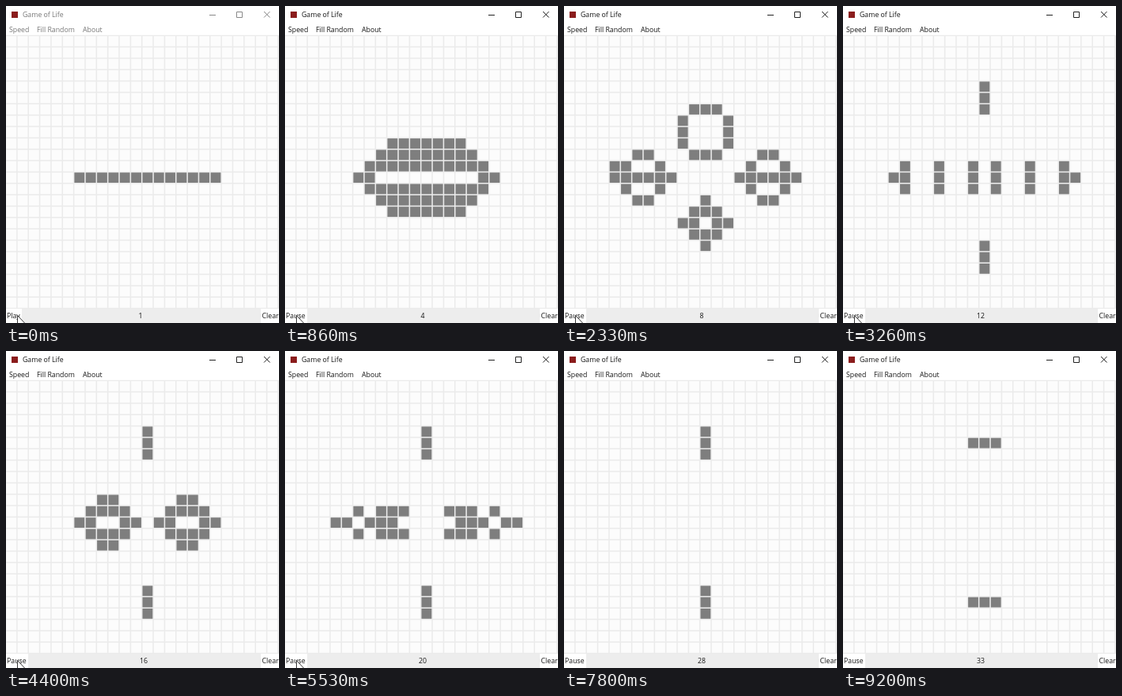
Recreate the animation shown at these times as an HTML page. Size 345 by 400 pixels, loop 9.53 s.

```html
<!DOCTYPE html>
<html lang="en">
<head>
<meta charset="utf-8">
<title>Game of Life</title>
<style>
  html, body { margin: 0; width: 100%; height: 100%; overflow: hidden; background: #fff; }
  svg { display: block; width: 100%; height: 100%; }
  text { font: 8.75px "Open Sans", "Noto Sans", sans-serif; fill: #161616; }
  .chrome path { fill: none; stroke: #222; }
  .inactive text { fill: #777; }
  .inactive path { stroke: #888; }
</style>
</head>
<body>
<svg viewBox="0 0 345 400">
  <rect width="345" height="400" fill="#fff"/>
  <g class="chrome" id="chrome">
    <rect x="7" y="7" width="8" height="8" fill="#8a1c1c"/>
    <text x="21" y="14">Game of Life</text>
    <text x="4" y="33">Speed</text>
    <text x="39" y="33">Fill Random</text>
    <text x="97" y="33">About</text>
    <path d="M257 11.5h8M291.5 7.5h7v7h-7zM326 7l7.500 7.500M333.500 7l-7.500 7.500"/>
  </g>
  <rect y="36.700" width="345" height="345.300" fill="#ebebeb"/>
  <g id="board"></g>
  <rect id="bar" y="382" height="18" fill="#ededed"/>
  <text id="toggle" x="1" y="394"></text>
  <text id="count" y="394" text-anchor="middle"></text>
  <text x="323.500" y="394">Clear</text>
  <path id="cursor" d="M0 0v14l3.200-3 2.300 5 2.200-1-2.300-4.800h4.300z" fill="#fff" stroke="#222" stroke-width=".9"/>
</svg>
<script>
const LOOP = 9530, SIZE = 24, PITCH = 14.35, LAST = 33;
const CURSOR_OUT = 6430;
const $ = id => document.getElementById(id);

const cells = Array.from({ length: SIZE * SIZE }, (_, i) => {
  const r = document.createElementNS('http://www.w3.org/2000/svg', 'rect');
  const attrs = {
    x: i % SIZE * PITCH + 0.3,
    y: Math.floor(i / SIZE) * PITCH + 38,
    width: 12.8, height: 12.8
  };
  for (const k in attrs) r.setAttribute(k, attrs[k].toFixed(2));
  return $('board').appendChild(r);
});

function step(grid) {
  return grid.map((alive, i) => {
    const x = i % SIZE, y = Math.floor(i / SIZE);
    let n = 0;
    for (let dy = -1; dy <= 1; dy++)
      for (let dx = -1; dx <= 1; dx++) {
        const u = x + dx, v = y + dy;
        if ((dx || dy) && u >= 0 && v >= 0 && u < SIZE && v < SIZE) n += grid[v * SIZE + u];
      }
    return n === 3 || (alive && n === 2) ? 1 : 0;
  });
}

// gens[n] is the board of generation n, starting with a row of 13 cells
const gens = [];
gens[1] = cells.map((_, i) => +(i >= 12 * SIZE + 6 && i <= 12 * SIZE + 18));
for (let n = 2; n <= LAST; n++) gens[n] = step(gens[n - 1]);

// Moment at which generation n starts to be drawn, linear between knots
const knots = [[2, 205], [4, 805], [9, 2316], [20, 5494], [28, 7787], [33, 9187]];
function startOf(n) {
  const k = knots.findIndex(([g]) => g >= n) || 1;
  const [a, ta] = knots[k - 1], [b, tb] = knots[k];
  return ta + (tb - ta) * (n - a) / (b - a);
}

function render(time) {
  // The screen refreshes 15 times a second
  const t = Math.floor((time + 7) * 0.015) / 0.015;

  let n = 1;
  while (n < LAST && startOf(n + 1) <= t) n++;
  const now = gens[n], before = gens[n - 1] || now;

  // Changed cells are repainted in reading order, one per millisecond
  let left = n > 1 ? Math.floor(t - startOf(n)) : 0;
  let done = true;
  cells.forEach((cell, i) => {
    let alive = now[i];
    if (alive !== before[i] && left-- <= 0) {
      alive = before[i];
      done = false;
    }
    cell.setAttribute('fill', alive ? '#7e7e7e' : '#fcfcfc');
  });

  const playing = t > 100, barX = playing ? 28 : 20;
  $('chrome').classList.toggle('inactive', t < 50);
  $('toggle').textContent = playing ? 'Pause' : 'Play';
  $('count').textContent = done ? n : n - 1;
  $('count').setAttribute('x', (barX + 320) / 2);
  $('bar').setAttribute('x', barX);
  $('bar').setAttribute('width', 322 - barX);

  const drop = Math.max(0, t - CURSOR_OUT) * 0.06;
  $('cursor').setAttribute('transform', `translate(14.5 ${390.5 + Math.min(drop, 20)})`);
}

const t0 = performance.now();
function frame() {
  render((performance.now() - t0) % LOOP);
  requestAnimationFrame(frame);
}
frame();
</script>
</body>
</html>
```
